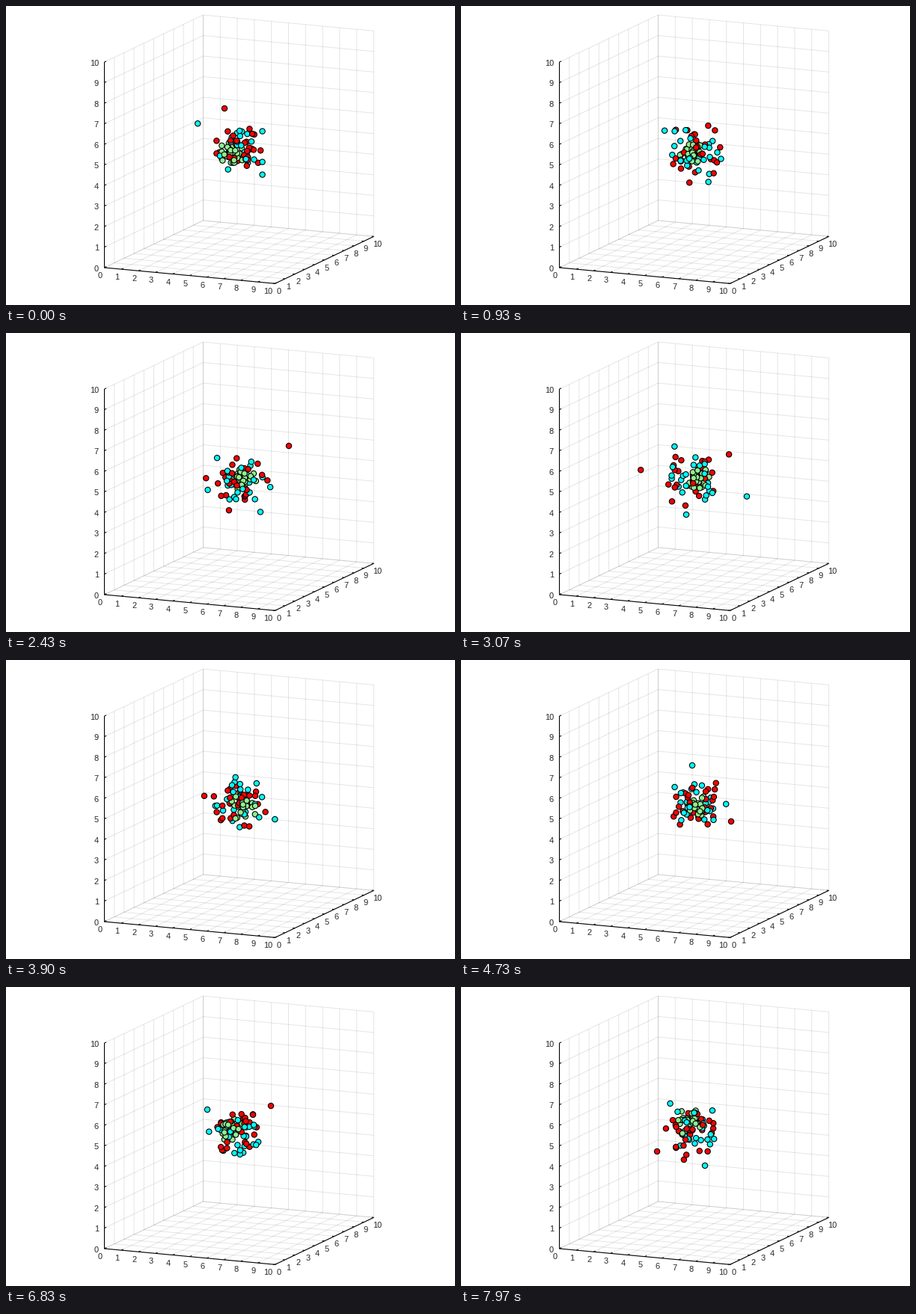
Animation, 600 px wide and 400 px high, one loop 8 s. Source, as a matplotlib script:

```python
import numpy as np
import matplotlib.pyplot as plt
from matplotlib.animation import FuncAnimation
from matplotlib.collections import LineCollection

W, H, DPI = 600, 400, 100
FRAMES, LOOP = 240, 8000
PX = 72 / DPI
RED, CYAN, GREEN = "#ff0000", "#00ffff", "#90ee90"
PER_COLOR = 29
rng = np.random.default_rng(11)

plt.rcParams["font.family"] = "Liberation Sans"
fig = plt.figure(figsize=(W / DPI, H / DPI), dpi=DPI, facecolor="white")
ax = fig.add_axes([0, 0, 1, 1])
ax.set_xlim(0, W)
ax.set_ylim(H, 0)
ax.axis("off")

# Parallel projection of the 0..10 cube
ORIGIN = np.array([131.5, 350.0])
BASIS = np.array([[22.8, 2.13], [13.2, -6.3], [0.0, -27.5]])


def project(x, y, z):
    return ORIGIN + np.array([x, y, z]) @ BASIS


def lines(segments, color, width):
    ax.add_collection(LineCollection(segments, colors=color, snap=False,
                                     linewidths=width * PX, zorder=1))


def label(pos, text, ha):
    ax.text(*pos, text, ha=ha, va="center_baseline", fontsize=11 * PX,
            color="#262626")


def draw_box():
    grid, ticks = [], []
    along_x, along_y = (b / np.hypot(*b) * 2.8 for b in BASIS[:2])
    for i in range(11):
        ends = [((i, 0, 0), (i, 10, 0)), ((0, i, 0), (10, i, 0)),
                ((0, i, 0), (0, i, 10)), ((0, 0, i), (0, 10, i)),
                ((i, 10, 0), (i, 10, 10)), ((0, 10, i), (10, 10, i))]
        grid += [(project(*a), project(*b)) for a, b in ends]
        px, py, pz = project(i, 0, 0), project(10, i, 0), project(0, 0, i)
        ticks += [(px, px + along_y), (py, py - along_x), (pz, pz + along_y)]
        label(px + (-3, 10), str(i), "right")
        label((361.6 + 12.85 * i, 381 - 6.3 * i), str(i), "left")
        label(pz + (-7.5, 0.7), str(i), "right")
    lines(grid, (0, 0, 0, 0.1), 1)
    corners = [project(0, 0, 10), project(0, 0, 0),
               project(10, 0, 0), project(10, 10, 0)]
    lines([corners], "black", 1.1)
    lines(ticks, "black", 1)


CENTRE = np.array([312, 195])
# Far swings out of the cloud: x, y and the second of the turning point
RED_SWINGS = [(292, 137, 0), (300, 257, 1.7), (378, 151, 2.4), (239, 183, 3.2),
              (361, 216, 4.7), (348, 127, 5.8), (354, 159, 6.8), (262, 220, 8)]
CYAN_SWINGS = [(252, 154, 0.3), (348, 246, 1.8), (383, 219, 3.2), (301, 243, 3.1),
               (309, 141, 4.7), (280, 236, 5.7), (269, 164, 6.8), (326, 239, 8)]


class Cloud:
    """Particles on seeded ellipses; the first ones each swing out once."""

    def __init__(self, spread, swings=()):
        self.a, self.b = spread * rng.normal(size=(2, PER_COLOR, 2)).clip(-1.7, 1.7)
        self.speed = 2 * np.pi / rng.uniform(3, 5, (PER_COLOR, 1))
        self.swings = np.array(swings, float).reshape(-1, 3)

    def at(self, t, centre):
        angle = self.speed * t
        pos = centre + self.a * np.cos(angle) + self.b * np.sin(angle)
        n = len(self.swings)
        pull = np.exp(-((t - self.swings[:, 2:]) / 1.1) ** 2)
        pos[:n] += (self.swings[:, :2] - pos[:n]) * pull
        return pos


def green_centre(t):
    return np.array([311 - 9 * np.cos(2 * np.pi * t / 6.8),
                     196 - 18 * (t / 8) ** 8])


red, cyan = Cloud(18, RED_SWINGS), Cloud(18, CYAN_SWINGS)
green = Cloud(8)
colors = np.repeat([RED, CYAN, GREEN], PER_COLOR)
order = rng.permutation(len(colors))


def positions(frame):
    t = frame * LOOP / FRAMES / 1000
    parts = [red.at(t, CENTRE), cyan.at(t, CENTRE), green.at(t, green_centre(t))]
    return np.concatenate(parts)[order]


draw_box()
start = positions(0)
dots = ax.scatter(start[:, 0], start[:, 1], s=(7.3 * PX) ** 2, c=colors[order],
                  edgecolors="black", linewidths=1.1 * PX, zorder=3)


def update(frame):
    dots.set_offsets(positions(frame))
    return (dots,)


anim = FuncAnimation(fig, update, frames=FRAMES, interval=LOOP / FRAMES,
                     repeat=True, repeat_delay=0)
plt.show()
```
